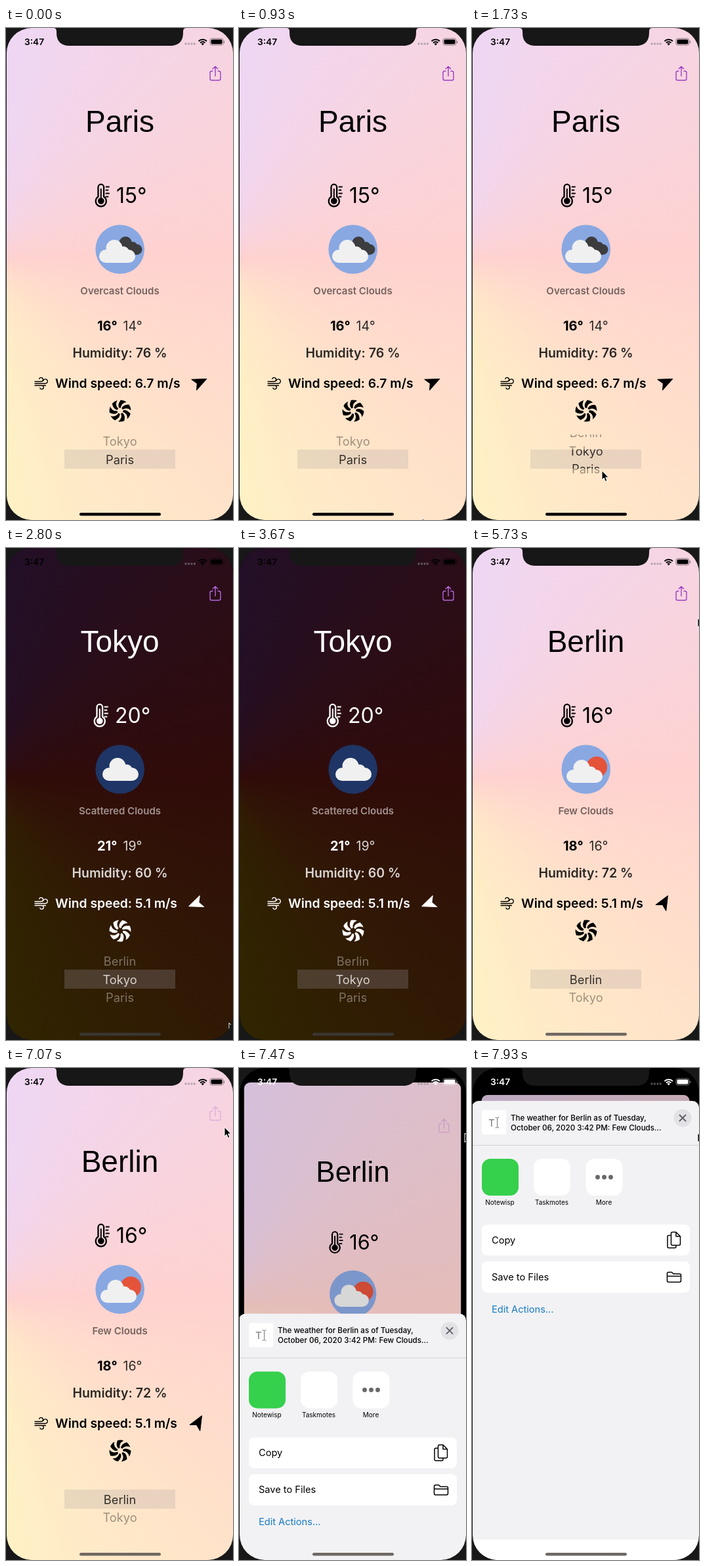
Write an HTML page that moves like this. It is 346x748 px and loops after 8000 ms.

```html
<!DOCTYPE html>
<html lang="en">
<head>
<meta charset="utf-8">
<title>Weather</title>
<style>
html, body { margin: 0; width: 100%; height: 100%; overflow: hidden; background: #181818; }
#phone { position: absolute; left: 1px; top: 0; width: 345px; height: 748px; overflow: hidden; border-radius: 38px; background: #000; }
#phone > *, .tint, svg { position: absolute; left: 0; top: 0; }
.layer, svg { left: -1px !important; width: 346px; height: 748px; }
.layer svg { left: 0 !important; }
#page { overflow: hidden; background: #fff; color: #000; transform-origin: 173.5px 0; }
#page.dark { background: #000; color: #fff; }
.tint { width: 100%; height: 100%; opacity: .23; background: conic-gradient(at -40px 350px, #af52de 0deg, #ff3b30 90deg, #ffcc00 180deg, #af52de 360deg); }
.dark .tint { opacity: .19; }
#shade { width: 100%; height: 100%; position: absolute; left: 0; top: 0; background: #000; }
#sheet { background: #f2f2f5; border-radius: 10px 10px 0 0; overflow: hidden; }
text { font-family: Inter, Roboto, sans-serif; fill: currentColor; }
#city { font: 46px "Liberation Sans", Arial, sans-serif; }
.line { fill: none; stroke: currentColor; stroke-linecap: round; stroke-linejoin: round; }
.mid { text-anchor: middle; }
.semi { font-weight: 600; }
#disc { fill: #89a8e2; }
.dark #disc { fill: #1e3565; }
#band { fill: #767680; opacity: .16; }
.dark #band { fill: #8a8088; opacity: .32; }
#share { color: #9a3fc4; }
.dark #share { color: #b566e0; }
</style>
</head>
<body>
<div id="phone">
  <div id="page" class="layer">
    <div class="tint"></div>
    <svg viewBox="0 0 346 748">
      <defs>
        <clipPath id="wheel"><rect x="80" y="618" width="190" height="77"/></clipPath>
        <clipPath id="inBand"><rect x="89" y="641" width="169" height="29"/></clipPath>
        <clipPath id="offBand"><path d="M80 618h190v23H80zM80 670h190v25H80z"/></clipPath>
        <g id="cloud">
          <circle cx="10" cy="25" r="10"/><circle cx="23" cy="12.5" r="12.5"/>
          <circle cx="37" cy="19" r="9"/><circle cx="45" cy="25" r="10"/>
          <path d="M10 17h35v18H10z"/>
        </g>
      </defs>
      <g id="share" class="line" stroke-width="1.4">
        <path d="M315 65.500h-1.500q-2.500 0-2.500 2.500v9q0 2.500 2.500 2.500h11q2.500 0 2.500-2.500v-9q0-2.500-2.500-2.500H323M319 73V58.500M315.300 62l3.700-3.600 3.700 3.600"/>
      </g>
      <text id="city" class="mid" x="173.500" y="158"></text>
      <g id="thermo">
        <path class="line" stroke-width="2.300" d="M140.500 256.500V242a4.300 4.300 0 0 1 8.600 0v14.500a8 8 0 1 1-8.600 0z"/>
        <circle cx="144.800" cy="263" r="4.800" fill="currentColor"/>
        <path class="line" stroke-width="2" d="M144.800 245v18M152.500 241.500h4.500M152.500 246.500h3M152.500 251.500h4.500M152.500 256.500h3"/>
        <text id="temp" x="168" y="266" font-size="32"></text>
      </g>
      <circle id="disc" cx="173.700" cy="336.500" r="37.300"/>
      <circle id="sun" cx="190" cy="333" r="16" fill="#e5533a"/>
      <use id="backCloud" href="#cloud" fill="#3d3d3f" transform="translate(164 317) scale(.79)"/>
      <use id="frontCloud" href="#cloud" fill="#f0f0f0"/>
      <text id="sky" class="mid semi" x="173.500" y="405" font-size="15" opacity=".54"></text>
      <text id="high" x="139" y="460" font-size="20" font-weight="700"></text>
      <text id="low" x="178.500" y="460" font-size="19.500" opacity=".82"></text>
      <text id="humidity" class="mid semi" x="173.500" y="501" font-size="19.500" opacity=".82"></text>
      <path class="line" stroke-width="1.300" d="M44 537.500h9.500a3 3 0 1 0-2.800-4M44 540.500h16a3.300 3.300 0 1 0-3.200-4.300M44 543.500h10.500a2.800 2.800 0 1 1-2.700 3.700M57 543.500h3.500"/>
      <text id="wind" class="semi" x="75" y="547" font-size="19.300"></text>
      <path id="arrow" fill="currentColor" stroke="currentColor" stroke-linejoin="round" d="M13 0L-8-9L-3 0L-8 9z"/>
      <g id="fan" fill="currentColor"></g>
      <rect id="band" x="89" y="641" width="169" height="29"/>
      <g clip-path="url(#inBand)"><g class="rows" opacity=".78"></g></g>
      <g clip-path="url(#offBand)"><g class="rows" opacity=".38"></g></g>
    </svg>
    <div id="shade"></div>
  </div>

  <div id="sheet" class="layer">
    <svg viewBox="0 50 346 748">
      <rect x="15" y="64" width="37" height="37" rx="3" fill="#fff"/>
      <text x="25" y="89" font-size="15" fill-opacity=".55">T</text>
      <path class="line" stroke="#777" stroke-width="1" d="M36 75q2.500 0 2.500 2v12q0 2-2.500 2M41 75q-2.500 0-2.500 2v12q0 2 2.500 2" style="color:#777"/>
      <g font-size="11.600" font-weight="500">
        <text x="59" y="80">The weather for Berlin as of Tuesday,</text>
        <text x="59" y="95">October 06, 2020 3:42 PM: Few Clouds...</text>
      </g>
      <circle cx="321" cy="76" r="13.500" fill="#e2e2e6"/>
      <path class="line" style="color:#626266" stroke-width="2" d="M316.500 71.500l9 9m0-9l-9 9"/>
      <path d="M0 117.500h346" stroke="#d2d2d5"/>
      <rect x="15" y="138" width="56" height="56" rx="13" fill="#35d04c"/>
      <rect x="94" y="138" width="56" height="56" rx="13" fill="#fff"/>
      <rect x="173.500" y="138" width="56" height="56" rx="13" fill="#fff"/>
      <g fill="#68686b"><circle cx="191.500" cy="166" r="3.400"/><circle cx="201.500" cy="166" r="3.400"/><circle cx="211.500" cy="166" r="3.400"/></g>
      <g class="mid" font-size="10">
        <text x="42.500" y="208">Notewisp</text>
        <text x="121.500" y="208">Taskmotes</text>
        <text x="201" y="208">More</text>
      </g>
      <rect x="15" y="238" width="317" height="47" rx="8" fill="#fff"/>
      <rect x="15" y="294" width="317" height="47.500" rx="8" fill="#fff"/>
      <g font-size="14.600">
        <text x="30" y="267">Copy</text>
        <text x="30" y="323">Save to Files</text>
        <text x="30" y="372" style="color:#187bc4">Edit Actions...</text>
      </g>
      <path class="line" stroke-width="1.500" d="M303 254.500h-3q-2 0-2 2v15q0 2 2 2h9q2 0 2-2v-2M303.500 251.500q0-2 2-2h5.500l6.500 6.500v11.500q0 2-2 2h-10q-2 0-2-2zM311 249.500v6.500h6.500"/>
      <path class="line" stroke-width="1.500" d="M297.500 323v-10.500q0-2 2-2h5l2.500 2.500h9.500q2 0 2 2v8q0 2.500-2 2.500h-17q-2 0-2-2.500zM297.500 316.500h21"/>
      <rect y="717" width="346" height="40" fill="#fff"/>
    </svg>
  </div>

  <svg viewBox="0 0 346 748">
    <path fill="#171717" d="M72 0q5 0 5 5v2q0 20 20 20h153q20 0 20-20V5q0-5 5-5z"/>
    <g id="status">
      <text class="semi" x="28" y="26" font-size="13.700">3:47</text>
      <g fill="#888" opacity=".6"><circle cx="274" cy="24" r="1.700"/><circle cx="278.500" cy="24" r="1.700"/><circle cx="283" cy="24" r="1.700"/><circle cx="287.300" cy="24" r="1.700"/></g>
      <path class="line" stroke-width="2" style="stroke-linecap:butt" d="M293.500 20a9 9 0 0 1 12.500 0M296 22.600a5.500 5.500 0 0 1 7.500 0"/>
      <path fill="currentColor" d="M297.500 24a3.200 3.200 0 0 1 4.500 0l-2.250 2.500z"/>
      <rect x="311" y="16" width="20" height="10" rx="3" fill="none" stroke="currentColor" opacity=".45"/>
      <rect x="312.500" y="17.500" width="17" height="7" rx="1.800" fill="currentColor"/>
      <path d="M332.500 19.500v3.500" stroke="currentColor" opacity=".5"/>
    </g>
    <rect id="home" x="112" y="737" width="124" height="4.600" rx="2.300"/>
    <path id="cursor" fill="#000" stroke="#fff" stroke-width="1" stroke-linejoin="round" d="M0 0V14l3.200-3 2.300 5.400 2.500-1.100-2.300-5.200H10z"/>
  </svg>
</div>

<script>
const LOOP = 8000, STEP = 1000 / 15;
const DARK_AT = 2400, LIGHT_AT = 5120, TAP_AT = 6330, STALL_AT = 6400, SHEET_AT = 7340;
const ROWS = ["Berlin", "Tokyo", "Paris"], ROW_HEIGHT = 27.5;

const CITIES = {
  Paris: { temp: 15, x: 0, sky: "Overcast Clouds", high: 16, low: 14, humidity: 76, wind: 6.7, arrow: [294, 539, -25], cloud: [142, 322], back: "backCloud" },
  Tokyo: { temp: 20, x: -2, sky: "Scattered Clouds", high: 21, low: 19, humidity: 60, wind: 5.1, arrow: [291, 540, 159], cloud: [147, 319] },
  Berlin: { temp: 16, x: 0, sky: "Few Clouds", high: 18, low: 16, humidity: 72, wind: 5.1, arrow: [292, 540, -60], cloud: [144, 322], back: "sun" }
};

// Tables of [time, ...values], linear in between.
const CURSOR = [
  [0, 400, 760], [930, 400, 760], [930, 280, 746], [1130, 236, 700], [1330, 200, 660], [1530, 198, 658],
  [1733, 198, 673], [1900, 198, 686], [2100, 205, 690], [2400, 270, 705], [2800, 340, 722], [2900, 352, 726],
  [3980, 352, 726], [3980, 323, 711], [4330, 200, 657], [4400, 200, 657], [4660, 200, 685], [4740, 206, 687],
  [5000, 326, 709], [5100, 352, 714], [5650, 352, 114], [6067, 312, 77], [6260, 308, 69],
  [7060, 308, 69], [7060, 333, 90], [7127, 333, 90], [7127, 344, 99], [8000, 344, 99]
];
const WHEEL = [[0, 2], [1530, 2], [1733, 1.47], [1930, 1], [4400, 1], [4700, 0], [8000, 0]];

const $ = id => document.getElementById(id);
const clamp = v => Math.min(1, Math.max(0, v));

function sample(table, t) {
  let i = table.length - 2;
  while (i > 0 && table[i][0] > t) i--;
  const [a, b] = [table[i], table[i + 1]];
  const k = clamp((t - a[0]) / (b[0] - a[0] || 1));
  return a.slice(1).map((v, n) => v + (b[n + 1] - v) * k);
}

function polar(r, deg) {
  const a = deg * Math.PI / 180;
  return `${(r * Math.cos(a)).toFixed(2)} ${(r * Math.sin(a)).toFixed(2)}`;
}

function buildFan() {
  const blade = `M${polar(4.5, -8)}Q${polar(10.5, -14)} ${polar(16.5, 16)}` +
    `A16.5 16.5 0 0 1 ${polar(16.5, 49)}Q${polar(12, 20)} ${polar(4.5, 24)}z`;
  $("fan").innerHTML = Array.from({ length: 7 }, (_, i) =>
    `<path d="${blade}" transform="rotate(${i * 360 / 7})"/>`).join("");
}

let shown;
function showCity(name) {
  if (name === shown) return;
  shown = name;
  const c = CITIES[name];
  const labels = {
    city: name, temp: c.temp + "°", sky: c.sky, high: c.high + "°", low: c.low + "°",
    humidity: `Humidity: ${c.humidity} %`, wind: `Wind speed: ${c.wind} m/s`
  };
  for (const id in labels) $(id).textContent = labels[id];
  const [x, y, angle] = c.arrow;
  $("arrow").setAttribute("transform", `translate(${x} ${y}) rotate(${angle})`);
  $("thermo").setAttribute("transform", `translate(${c.x} 0)`);
  $("frontCloud").setAttribute("transform", `translate(${c.cloud})`);
  for (const id of ["sun", "backCloud"]) $(id).style.display = c.back === id ? "" : "none";
  $("page").classList.toggle("dark", name === "Tokyo");
}

function render(time) {
  const t = Math.floor((time + 5) / STEP) * STEP;
  showCity(t < DARK_AT ? "Paris" : t < LIGHT_AT ? "Tokyo" : "Berlin");

  const spin = Math.min(t, STALL_AT) * 0.15;
  $("fan").setAttribute("transform", `translate(174 582) rotate(${spin})`);

  const [row] = sample(WHEEL, t);
  for (const g of document.querySelectorAll(".rows"))
    g.setAttribute("transform", `translate(0 ${-row * ROW_HEIGHT})`);

  const [x, y] = sample(CURSOR, t);
  $("cursor").setAttribute("transform", `translate(${x} ${y})`);
  $("share").setAttribute("opacity", t >= TAP_AT ? 0.25 : 1);

  const rise = 1 - (1 - clamp((t - SHEET_AT) / 560)) ** 3;
  $("sheet").style.transform = `translateY(${748 - 698 * rise}px)`;
  $("page").style.transform = `translateY(${41 * rise}px) scale(${1 - 0.084 * rise})`;
  $("page").style.borderRadius = rise ? "10px" : "0";
  $("shade").style.opacity = 0.2 * rise;
  $("status").style.color = rise > 0.35 ? "#fff" : "#000";
  $("home").style.fill = t < DARK_AT ? "#000" : t < LIGHT_AT ? "#3a3632" : "#6f6862";
}

buildFan();
for (const g of document.querySelectorAll(".rows"))
  g.innerHTML = ROWS.map((name, i) =>
    `<text class="mid" x="173.5" y="${662.5 + i * ROW_HEIGHT}" font-size="18.3">${name}</text>`).join("");

function tick() {
  render(performance.now() % LOOP);
  requestAnimationFrame(tick);
}
tick();
</script>
</body>
</html>
```
